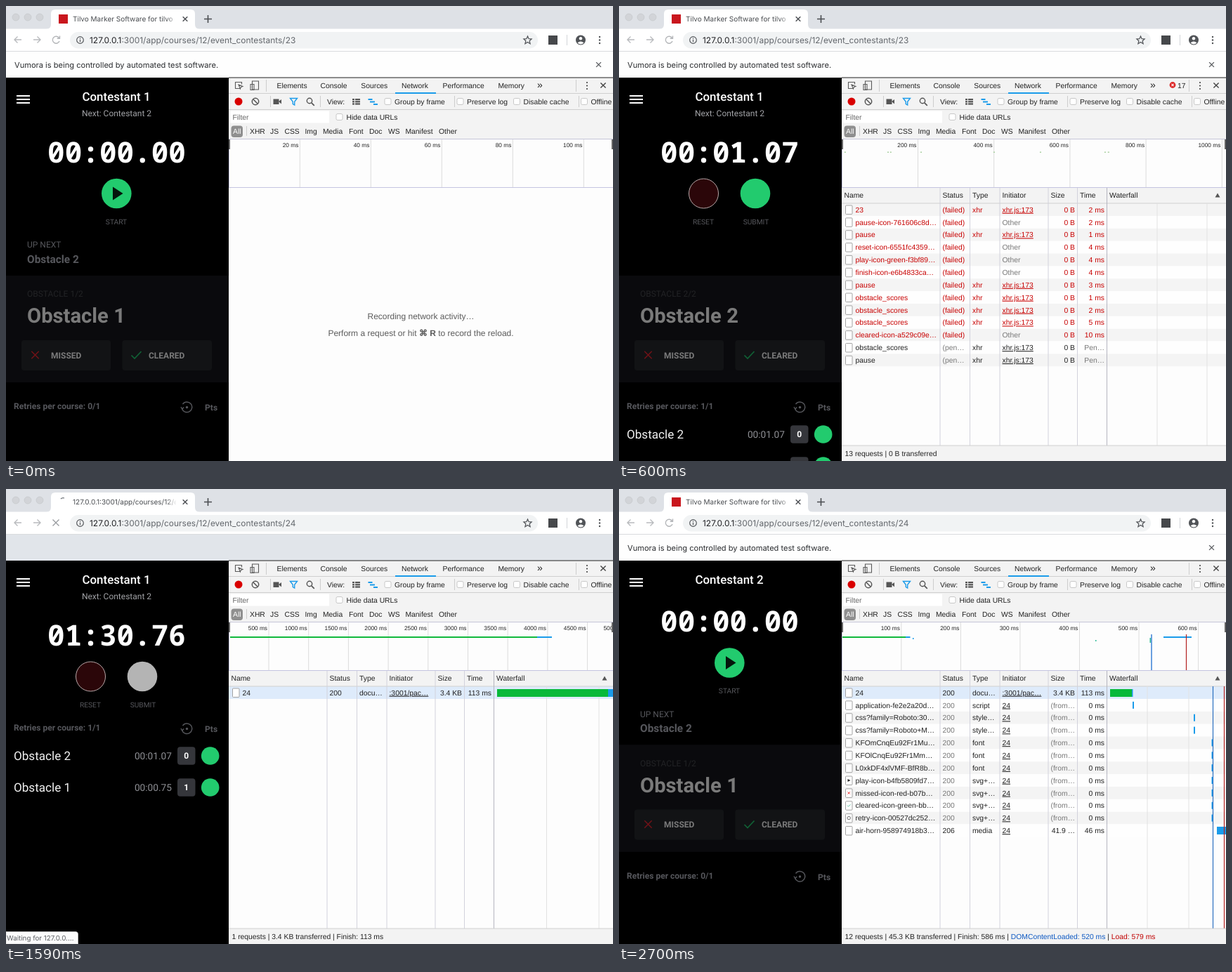
Recreate the animation shown at these times as an HTML page. Size 864 by 648 pixels, loop 2730 ms.

```html
<!DOCTYPE html>
<html lang="en">
<head>
<meta charset="utf-8">
<title>Contest timer</title>
<style>
html, body { margin: 0; width: 100%; height: 100%; overflow: hidden; background: #fff; }
svg { position: fixed; left: 0; top: 0; width: 100%; height: 100%; display: block; }
text { white-space: pre; text-rendering: geometricPrecision; }
.app { font-family: Roboto, sans-serif; }
.ui { font-family: Inter, sans-serif; }
.dev { font-family: "Liberation Sans", Arial, sans-serif; }
.clock { font-family: "Noto Sans Mono", "DejaVu Sans Mono", monospace; font-weight: 700; }
</style>
</head>
<body>
<svg viewBox="0 0 864 648">
  <defs>
    <linearGradient id="fade"><stop offset="0" stop-color="#fff" stop-opacity="0"/><stop offset="1" stop-color="#fff"/></linearGradient>
    <clipPath id="tab"><rect x="90" y="5" width="152" height="27"/></clipPath>
    <clipPath id="phone"><rect x="0" y="102" width="317" height="546"/></clipPath>
  </defs>
  <g id="frame" class="ui"></g>
  <g id="tools" class="dev"></g>
  <g id="net" class="dev"></g>
  <g id="app" class="app" clip-path="url(#phone)"></g>
  <g id="hint" class="ui"></g>
</svg>
<script>
const LOOP = 2730, STEP = 30;
const START = 240, CLEAR1 = 480, STOP = 570, COLLAPSE = 690, SUBMIT = 840;
const MODAL_IN = 870, MODAL_OUT = 1410, NAV = 1530, LOADED = 1650;
const GREEN = '#22cb6e', RED = '#c80000', BLUE = '#1a9bea';

const $ = id => document.getElementById(id);
const text = (x, y, s, size, fill, more = '') =>
  `<text x="${x}" y="${y}" font-size="${size}" fill="${fill}" ${more}>${s}</text>`;
const rect = (x, y, w, h, fill, more = '') =>
  `<rect x="${x}" y="${y}" width="${w}" height="${h}" fill="${fill}" ${more}/>`;
const circle = (x, y, r, fill, more = '') =>
  `<circle cx="${x}" cy="${y}" r="${r}" fill="${fill}" ${more}/>`;
const path = (d, stroke, width = 1, more = '') =>
  `<path d="${d}" fill="none" stroke="${stroke}" stroke-width="${width}" ${more}/>`;
const cross = (x, y, r, stroke, width) =>
  path(`M${x - r} ${y - r}l${2 * r} ${2 * r}m0 ${-2 * r}l${-2 * r} ${2 * r}`, stroke, width);
const BOLD = 'font-weight="700" ', MEDIUM = 'font-weight="500" ', MID = 'text-anchor="middle" ', END = 'text-anchor="end"';

// ---- browser frame ----
function frameView(t) {
  const loading = t >= NAV && t < LOADED;
  const id = t >= NAV ? 24 : 23;
  let s = rect(0, 0, 864, 33, '#dee1e6') + rect(0, 32.5, 864, 32, '#fff');
  for (const x of [14, 31, 48]) s += circle(x, 16, 5, '#d2d4d8', 'stroke="#c5c7cb" stroke-width=".7"');
  s += '<path d="M57 33q7 0 7-7V11q0-6 6-6H263q6 0 6 6V26q0 7 7 7z" fill="#fff"/>';
  s += loading ? path('M78 14a5 5 0 0 1 5 -1', '#6b7076', 1.3) : rect(75, 12, 13, 13, '#c9161d');
  s += '<g clip-path="url(#tab)">' +
    text(95, 22, loading ? '127.0.0.1:3001/app/courses/12/event' : 'Tilvo Marker Software for tilvo', 10, '#4a4d51') +
    rect(228, 8, 15, 22, 'url(#fade)') + '</g>';
  s += cross(255, 18.5, 3.3, '#4b4e52', 1.4) + path('M282 18.5h11M287.5 13v11', '#4b4e52', 1.6);
  s += path('M22 48H12m4.5-4.5L12 48l4.5 4.5M39 48h10m-4.5-4.5L49 48l-4.5 4.5', '#b9bbbe', 1.4);
  s += loading ? cross(71, 48, 4.5, '#9a9da1', 1.4)
    : path('M75.5 45.5A5 5 0 1 0 76 50M76.5 42.5v3.8h-3.8', '#b4b6b9', 1.4);
  s += rect(91, 37, 666, 23.5, '#f1f3f4', 'rx="11.7"');
  s += circle(105.5, 48.5, 4.8, 'none', 'stroke="#55585c" stroke-width="1.2"') + path('M105.5 47.8v3.4M105.5 45.5v1.3', '#55585c', 1.2);
  s += text(119, 52.5, `127.0.0.1<tspan fill="#63676c">:3001/app/courses/12/event_contestants/${id}</tspan>`, 11.95, '#202124');
  s += path('M742.5 43l1.6 3.7 4 .3-3 2.7 1 4-3.6-2.2-3.6 2.2 1-4-3-2.7 4-.3z', '#4f5256', 1.2);
  s += rect(772, 42, 13, 13, '#46484b') + path('M798.5 41v15', '#d3d5d8');
  s += circle(818, 48.5, 7, '#515458') + circle(818, 46.3, 2.2, '#fff') + '<path d="M813.5 52.5q4.500-4 9 0q-4.500 4-9 0" fill="#fff"/>';
  for (const y of [44, 48.5, 53]) s += circle(845, y, 1.2, '#515458');
  s += rect(0, 64.5, 864, 38, loading ? '#e1e5ea' : '#fefefe') + path('M0 64.5H864', '#d9dbde');
  if (!loading) {
    s += text(12, 87.7, 'Vumora is being controlled by automated test software.', 11.1, '#2b2d30');
    s += cross(843.5, 83.5, 3.4, '#55585c', 1.3);
  }
  return s;
}

// ---- fixed part of the developer tools ----
const INK = '#222', UI = 10.35;
const labels = (y, list) => list.map(([x, s]) => text(x, y, s, UI, INK)).join('');
function toolsView() {
  let s = rect(317, 102, 547, 546, '#fdfdfd') + rect(317, 102, 547, 87, '#f3f3f3');
  s += rect(317, 101.5, 547, 1, '#222') + path('M317 124.5H864M317 147.5H864', '#cfcfcf') + path('M317 189.5H864', '#c6c6d8');
  s += path('M334 117.5h-7.5v-9h9v3M331 112l6 2.5-2.6 1-1 2.6z', '#5a5a5a', 1.1);
  s += path('M350.5 107h9v12h-9zM348 111.5h5v8h-5z', '#5a5a5a', 1.1);
  s += path('M370.5 105v17M811.5 105v17M376.5 128v16M447.5 128v16M638.5 128v16M815.5 128v16M342.5 171v14', '#cdcdcd');
  s += labels(117, [[385.5, 'Elements'], [447.5, 'Console'], [505.3, 'Sources'], [563, 'Network'], [621.5, 'Performance'], [700.5, 'Memory']]);
  s += text(756, 117, '»', 14, INK) + rect(554, 123, 58, 2, BLUE);
  for (const y of [109, 113.5, 118]) s += circle(827, y, 1.1, '#444');
  s += cross(850, 113, 3.6, '#444', 1.4);
  s += circle(331, 136, 5.5, '#d90000');
  s += circle(355, 136, 4.7, 'none', 'stroke="#555" stroke-width="1.5"') + path('M351.8 132.8l6.4 6.4', '#555', 1.5);
  s += rect(380.5, 132.5, 8, 7.5, '#555') + '<path d="M388 136l4-3v6.5z" fill="#555"/>';
  s += path('M404.5 131.5h10l-3.8 4.8v4.7l-2.4-1.5v-3.2z', BLUE, 1.4);
  s += circle(432, 135, 3.7, 'none', 'stroke="#555" stroke-width="1.4"') + path('M434.8 137.8l4 4', '#555', 1.7);
  s += text(457, 139.5, 'View:', UI, INK);
  for (const y of [132, 135.2, 138.4]) s += rect(493, y, 3, 2.2, '#555') + rect(497, y, 7, 2.2, '#555');
  s += path('M515.5 133h6M518 136.5h7M523 140h6', BLUE, 2);
  for (const [x, y] of [[543.5, 136], [646.5, 136], [727, 136], [823, 136], [474.5, 158]])
    s += rect(x - 4.5, y - 4.5, 9, 9, '#fff', 'rx="2" stroke="#bbb" stroke-width=".8"');
  s += labels(139.5, [[553, 'Group by frame'], [656, 'Preserve log'], [736.5, 'Disable cache'], [832.5, 'Offline']]);
  s += rect(319, 149.5, 141, 17, '#fff') + text(322.5, 162, 'Filter', UI, '#666') + text(484.5, 161.5, 'Hide data URLs', UI, INK);
  s += rect(320.5, 170.5, 16.5, 16.5, '#8f8f8f', 'rx="4"') + text(323, 182, 'All', UI, '#fff');
  return s + labels(182, [[347, 'XHR'], [376, 'JS'], [396.5, 'CSS'], [425.5, 'Img'], [451, 'Media'], [488, 'Font'], [517, 'Doc'], [544, 'WS'], [568.5, 'Manifest'], [616, 'Other']]);
}

// ---- network log ----
const FAILED = `23|x|2 pause-icon-761606c8d…||2 pause|x|1 reset-icon-6551fc4359…||4 play-icon-green-f3bf89…||4
finish-icon-e6b4833ca…||4 pause|x|3 obstacle_scores|x|1 obstacle_scores|x|2 obstacle_scores|x|5 cleared-icon-a529c09e…||10
obstacle_scores|x|10 pause|x|9 time_adjustment|x|3 23|x|1`.split(/\s+/).map(r => r.split('|'));
const LOADS = `24|docu… application-fe2e2a20d…|script css?family=Roboto:30…|style… css?family=Roboto+M…|style…
KFOmCnqEu92Fr1Mu…|font KFOlCnqEu92Fr1Mm…|font L0xkDF4xlVMF-BfR8b…|font play-icon-b4fb5809fd7…|svg+…
missed-icon-red-b07b…|svg+… cleared-icon-green-bb…|svg+… retry-icon-00527dc252…|svg+… air-horn-958974918b3…|media`
  .split(/\s+/).map(r => r.split('|'));
// time, rows, errors, ruler unit (ms), ruler step (px)
const STAGES = [[0, 0, 0, 20, 101], [300, 2, 2, 50, 120], [360, 3, 3, 100, 140], [420, 6, 7, 100, 95], [480, 9, 11, 200, 150],
  [540, 11, 15, 200, 116], [STOP, 13, 17, 200, 108.2], [630, 13, 21, 200, 100], [COLLAPSE, 13, 21, 200, 80],
  [SUBMIT, 15, 25, 200, 55.4], [NAV, 1, 0, 500, 56.7], [LOADED, 12, 0, 100, 84.55]];
const PINGS = [9, 122, 129, 209, 401, 523, 693, 702, 1202];
const rowY = i => 290 + i * 17.86;

function ruler(unit, step) {
  let s = '';
  for (let i = 1; i < 12; i++) {
    const x = 317.3 + i * step;
    if (x > 900) break;
    s += path(`M${x} 190V258`, '#dcdcdc') + text(x - 2, 201, i * unit + ' ms', 8.3, INK, END);
  }
  return s + rect(317, 190, 2, 14, '#666') + rect(862, 190, 2, 14, '#666') + path('M317 258.5H864M317.5 204V258', '#c4c4e0');
}

function row(i, cells, color, muted, fill) {
  const y = rowY(i) + 3.7, [name, status, type, from, size, time] = cells;
  const link = from !== 'Other';
  return rect(317, rowY(i) - 8.9, 547, 17.86, fill) +
    rect(322.5, rowY(i) - 6, 9.5, 12.5, '#fff', 'rx="1" stroke="#999" stroke-width=".9"') +
    text(336.5, y, name, UI, color) + text(460.5, y, status, UI, muted) + text(503, y, type, UI, color) +
    text(545.5, y, from, UI, link ? color : '#777', link ? 'text-decoration="underline"' : '') +
    text(649, y, size, UI, size[0] === '(' ? '#777' : color, END) + text(691, y, time, UI, time[0] === 'P' ? '#777' : color, END);
}

function rowIcon(i) {
  const y = rowY(i);
  if (i === 7) return `<path d="M325.5 ${y - 2}l4 2-4 2z" fill="#222"/>`;
  if (i === 8) return cross(327.2, y, 1.6, '#e33', 1);
  if (i === 9) return path(`M325 ${y}l1.5 1.5 3-3`, '#5b9', 0.9);
  if (i === 10) return circle(327.2, y, 2.2, 'none', 'stroke="#555" stroke-width=".9"');
  return '';
}

function netView(t) {
  const [at, count, errors, unit, step] = STAGES.filter(s => s[0] <= t).pop();
  let s = ruler(unit, step);
  if (errors) s += circle(788, 112.5, 4.4, '#dc2a2a') + cross(788, 112.5, 1.6, '#fff', 1.1) + text(795, 116.5, errors, UI, INK);
  if (!count) {
    return s + text(590.5, 445.5, 'Recording network activity…', 12, '#5b5b5b', MID) +
      text(590.5, 469.5, 'Perform a request or hit <tspan font-weight="700">⌘ R</tspan> to record the reload.', 12, '#5b5b5b', MID);
  }
  const after = t >= NAV, loaded = t >= LOADED;
  for (let i = 0; i < count; i++) {
    const fill = after && !i ? '#deebfb' : i % 2 ? '#fefefe' : '#f4f4f4';
    if (!after) {
      const [name, xhr, ms] = FAILED[i];
      const wait = at === STOP && i > 10;
      s += row(i, [name, wait ? '(pen…' : '(failed)', xhr ? 'xhr' : '', xhr ? 'xhr.js:173' : 'Other', '0 B', wait ? 'Pen…' : ms + ' ms'],
        wait ? INK : RED, wait ? '#777' : RED, fill);
    } else {
      const [name, type] = LOADS[i], horn = i === 11;
      s += row(i, [name, horn ? '206' : '200', type, i ? '24' : ':3001/pac…', horn ? '41.9 …' : i ? '(from…' : '3.4 KB',
        horn ? '46 ms' : i ? '0 ms' : '113 ms'], INK, i && !horn ? '#777' : INK, fill) + rowIcon(i);
    }
  }
  s += rect(317, 259, 547, 22, '#f3f3f3') + path('M317 281H864', '#cfcfcf');
  s += labels(273, [[320.5, 'Name'], [460.5, 'Status'], [503, 'Type'], [545.5, 'Initiator'], [614.5, 'Size'], [656, 'Time'], [698, 'Waterfall']]);
  s += '<path d="M848.5 272.5h7l-3.5-6z" fill="#555"/>';
  s += path('M457 259V626M499.5 259V626M542 259V626M611 259V626M652.5 259V626', '#d2d2dc') + path('M694.5 259V626', '#b5b5c0');
  const grid = loaded ? [752, 811] : after ? [769.5, 844] : errors > 24 ? [780] : [766, 837];
  for (const x of grid) s += path(`M${x} 281V626`, '#e2e2e2');

  if (!after) {
    for (const ms of PINGS) {
      const x = 317 + ms / unit * step;
      if (x < 860 && (ms < 1000 || t >= SUBMIT)) s += rect(x - 1, 207.5, 2, 1.5, '#a9cfa0');
    }
  } else if (!loaded) {
    s += rect(319, 210, 437, 2, '#10b83c') + rect(756, 210, 21, 2, BLUE);
    s += rect(699, 285, 158, 11, '#08b93a') + rect(857, 285, 7, 11, BLUE);
  } else {
    s += rect(318, 210, 90, 2, '#10b83c') + rect(408, 210, 6.5, 2, BLUE) + rect(775, 210, 40, 2, BLUE);
    s += rect(418, 212, 1.5, 2, BLUE) + rect(678, 215, 1.5, 2, '#3b9') + rect(755.5, 212, 1.5, 7, '#3b9');
    s += path('M758 207V258', '#1b6ed0', 1.3) + path('M807.5 207V258', '#b32020', 1.2);
    s += rect(699, 285, 32, 11, '#08b93a') + rect(730, 285, 1.5, 11, BLUE);
    for (let i = 1; i < 11; i++) s += rect(i < 2 ? 731 : i < 4 ? 818 : 843.5, rowY(i) - 5, 2, 10, BLUE);
    s += rect(851, rowY(11) - 5.5, 13, 11, BLUE);
    s += path('M845.5 281V626', '#2a6fc0', 1.2) + path('M861.5 281V626', '#b32020', 1.2);
  }
  s += rect(317, 626, 547, 22, '#f3f3f3') + path('M317 626H864', '#cfcfcf');
  const sum = !after ? '0 B transferred' : loaded
    ? '45.3 KB transferred | Finish: 586 ms | <tspan fill="#0b57c2">DOMContentLoaded: 520 ms</tspan> | <tspan fill="#c00000">Load: 579 ms</tspan>'
    : '3.4 KB transferred | Finish: 113 ms';
  return s + text(321.5, 640.5, `${count} requests | ${sum}`, UI, INK);
}

// ---- contest app ----
const GREY = '#56575c';
function panel(n, dim) {
  const button = dim ? '#25282d' : '#333539';
  let s = rect(0, 384, 317, 152, '#15161b');
  s += text(30, 414, `OBSTACLE ${n}/2`, 12, '#46474d') + text(30, 451, 'Obstacle ' + n, 29.2, '#fff', BOLD);
  s += rect(22, 476, 127, 43, button, 'rx="4"') + rect(165.5, 476, 127.5, 43, button, 'rx="4"');
  s += cross(41.5, 497, 5.2, '#ee2430', 1.5) + path('M178.5 497.5l4.5 4.5 9.5-10', GREEN, 1.7);
  s += text(64, 501.8, 'MISSED', 12, '#fff', BOLD) + text(203, 501.8, 'CLEARED', 12, '#fff', BOLD);
  return s + (dim ? rect(0, 384, 317, 152, '#000', 'opacity=".52"') : '');
}

function score(y, n, time, pts) {
  return text(11, y + 6, 'Obstacle ' + n, 17.1, '#f2f2f2') + text(236, y + 5, time, 13.7, '#8d8e93', END) +
    rect(244, y - 12.7, 25.5, 25.5, '#35363b', 'rx="4"') + text(256.7, y + 4.3, pts, 12, '#fff', BOLD + MID) +
    circle(290.7, y, 12.8, GREEN);
}

function results(t) {
  const used = t >= CLEAR1 && t < LOADED;
  let s = text(11, 574, `Retries per course: ${used ? 1 : 0}/1`, 12, GREY, BOLD) + text(283, 576, 'Pts', 12, GREY, BOLD);
  s += path('M250.5 573.5A7.3 7.3 0 1 0 251.5 567M249 571l1.7 3 2.5-2.5', GREY, 1.4) + circle(257.5, 571.5, 1.7, GREY);
  if (!used) return s;
  const first = score(t >= STOP ? 655 : 610, 1, '00:00.75', 1);
  return s + (t >= STOP ? score(610, 2, '00:01.07', 0) : '') + first;
}

function clock(t) {
  if (t >= LOADED) return '00:00.00';
  if (t >= SUBMIT) return '01:30.76';
  const cs = t < START ? 0 : t >= STOP ? 107 : Math.round((t - 234) / 3);
  return `00:0${Math.floor(cs / 100)}.${String(cs % 100).padStart(2, '0')}`;
}

function modal(t) {
  if (t < MODAL_IN || t >= MODAL_OUT + 60) return '';
  const p = Math.min(1, (t - MODAL_IN + 30) / 90, (MODAL_OUT + 60 - t) / 60);
  const ease = 1 - (1 - p) ** 2;
  return rect(0, 102, 317, 546, '#000', `opacity="${0.5 * ease}"`) +
    `<g transform="translate(0 ${-165 * (1 - ease)})">` + rect(0, 100, 317, 16, '#000') + rect(0, 115, 317, 149, '#37383d') +
    text(157.5, 146, 'Unable to Save', 17.1, '#fff', BOLD + MID) + path('M15 166H299', '#d0d0d2') +
    text(15, 201.5, "Looks like you weren't able to connect to the server, make sure you are", 8.5, '#fff', MEDIUM) +
    text(15, 214.5, 'connected to the internet and click Retry to try again', 8.5, '#fff', MEDIUM) +
    rect(229, 226, 70.5, 31, GREEN, 'rx="4"') + text(264, 246, 'RETRY', 12, '#fff', BOLD + MID) + '</g>';
}

function appView(t) {
  const fresh = t < START || t >= LOADED, done = t >= STOP && t < LOADED, second = t >= CLEAR1 && t < LOADED;
  const flat = t >= COLLAPSE && t < LOADED;
  let s = rect(0, 102, 317, 546, '#000');
  s += text(157, 135, `Contestant ${t >= LOADED ? 2 : 1}`, 16.9, '#fff', MEDIUM + MID);
  if (t < LOADED) s += text(157.5, 156.5, 'Next: Contestant 2', 12, '#a2a3a7', MID);
  s += `<g transform="translate(0 ${t >= LOADED ? -19.5 : 0})">`;
  s += text(157.5, 222.5, clock(t), 41, '#fff', MID + 'class="clock"');
  if (done) {
    s += circle(120.5, 267, 21, '#2b0609', 'stroke="#b9a9aa"') + circle(194, 267, 21.3, t >= SUBMIT ? '#b4b4b4' : GREEN);
    s += text(120, 310.5, 'RESET', 10.2, GREY, MID) + text(195, 310.5, 'SUBMIT', 10.2, GREY, MID);
  } else {
    s += circle(157.3, 267, 21.3, fresh ? GREEN : '#f5222d');
    if (fresh) s += '<path d="M152 257.5l14.5 9.5-14.5 9.5z" fill="#05150c"/>';
    s += text(157, 310.5, fresh ? 'START' : 'PAUSE', 10.2, GREY, MID);
  }
  if (!second) s += text(30, 344, 'UP NEXT', 12, GREY) + text(30, 365.5, 'Obstacle 2', 15.4, GREY, BOLD);
  if (!flat) s += panel(second ? 2 : 1, fresh || done);
  s += `<g transform="translate(0 ${flat ? -230 : 0})">${results(t)}</g></g>` + modal(t);
  return s + path('M15 128H34M15 133H34M15 138H34', '#fff', 2);
}

const hintView = t => t < NAV || t >= LOADED ? '' :
  '<path d="M0 630.5H99q3.5 0 3.5 3.5V648H0z" fill="#fbfbfb" stroke="#ccc" stroke-width=".7"/>' +
  text(1, 643, 'Waiting for 127.0.0.…', 9.8, '#5c5f63');

// ---- playback ----
const views = { frame: frameView, net: netView, app: appView, hint: hintView };
const shown = {};
$('tools').innerHTML = toolsView();
function draw(t) {
  for (const id in views) {
    const markup = views[id](t);
    if (shown[id] !== markup) $(id).innerHTML = shown[id] = markup;
  }
}
const origin = performance.now();
function tick() {
  const t = (performance.now() - origin) % LOOP;
  draw(Math.floor(t / STEP) * STEP);
  requestAnimationFrame(tick);
}
tick();
</script>
</body>
</html>
```
